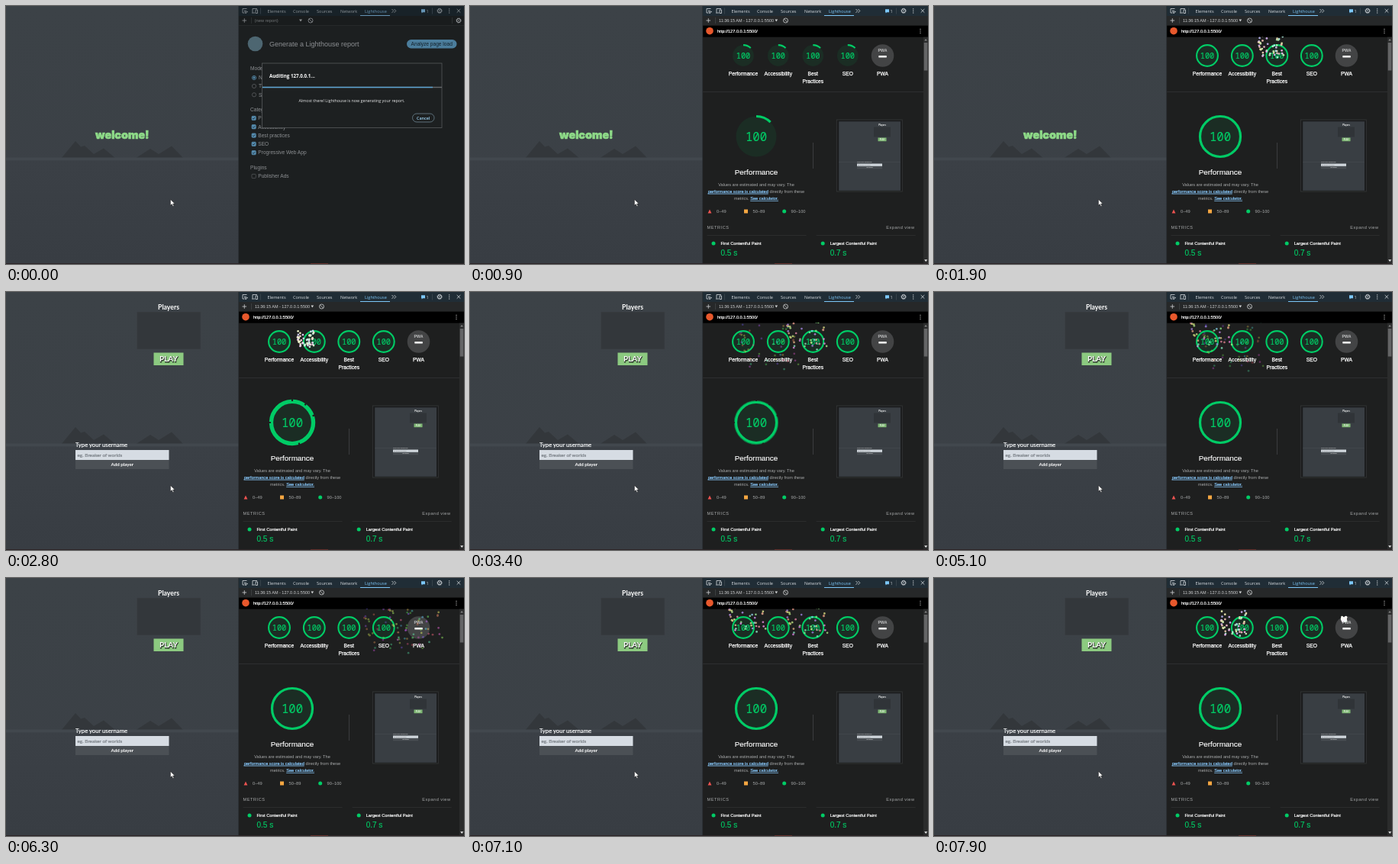
An HTML page that plays this animation: 600x338 px, repeating every 8000 ms.

```html
<!DOCTYPE html>
<html lang="en">
<head>
<meta charset="utf-8">
<title>Audit report</title>
<style>
html,body{margin:0;width:100%;height:100%;overflow:hidden;background:#1d1e1f}
svg{display:block;width:100vw;height:100vh}
text{white-space:pre}
.ui{font-family:"Open Sans","Noto Sans",sans-serif}
.ar{font-family:"Liberation Sans",Arial,sans-serif}
.mono{font-family:"Noto Sans Mono","DejaVu Sans Mono",monospace}
.game{font-family:Lato,Inter,sans-serif}
.title{font-family:Inter,sans-serif;font-weight:900}
</style>
</head>
<body>
<svg id="stage" viewBox="0 0 600 338" preserveAspectRatio="none"></svg>
<script>
const LOOP = 8000, REPORT_AT = 640, FORM_AT = 2300;
const GREEN = '#0c6', LINK = '#86c5f7';

const rect = (x, y, w, h, fill, extra = '') =>
  `<rect x="${x}" y="${y}" width="${w}" height="${h}" fill="${fill}" ${extra}/>`;
const circle = (x, y, r, fill, extra = '') =>
  `<circle cx="${x}" cy="${y}" r="${r}" fill="${fill}" ${extra}/>`;
const path = (d, stroke, width = .8, fill = 'none', extra = '') =>
  `<path d="${d}" stroke="${stroke}" stroke-width="${width}" fill="${fill}" ${extra}/>`;
const text = (x, y, size, fill, str, cls = 'ar', extra = '') =>
  `<text x="${x}" y="${y}" font-size="${size}" fill="${fill}" class="${cls}" ${extra}>${str}</text>`;
const MID = 'text-anchor="middle"', END = 'text-anchor="end"', BOLD = 'font-weight="700"';
const heavier = (color, width = .2) => `stroke="${color}" stroke-width="${width}"`;
const group = (id, body, extra = '') => `<g id="${id}" ${extra}>${body}</g>`;

const kebab = (x, y, c) => [-2.5, 0, 2.5].map(d => circle(x, y + d, .65, c)).join('');
const gear = (x, y, c) => circle(x, y, 2.5, 'none', `stroke="${c}" stroke-width="1"`) +
  circle(x, y, 3.1, 'none', `stroke="${c}" stroke-width=".8" stroke-dasharray="1.2 1.23"`) + circle(x, y, .8, c);
const blockIcon = (x, y, c) => path(`M${x - 3} ${y}a3 3 0 1 0 6 0a3 3 0 1 0-6 0M${x - 2} ${y - 2}l4 4`, c);

function gameBackdrop() {
  return rect(0, 0, 305, 338, 'url(#sky)') +
    path('M72 200L91 177L98 184.5L103 183L115 194L128 186.5L144 200Z', 'none', 0, '#33373b') +
    path('M169 200L189 187L200 194L217 183.5L233 200Z', 'none', 0, '#33373b') +
    rect(0, 198.5, 305, 4, '#42484e') + rect(0, 202.5, 305, 136, 'url(#ground)');
}

function gameForm() {
  return text(213, 23, 8.7, '#fff', 'Players', 'game', MID + ' ' + BOLD) +
    rect(171.5, 26, 83.5, 49, '#33373b', 'stroke="#3d4146" stroke-width=".6"') +
    rect(193.5, 79.5, 39, 16.5, '#8cca80') +
    text(213.5, 91.8, 10, '#2f3d2d', 'PLAY', 'game', MID + ' ' + BOLD + ' ' + heavier('#2f3d2d', .9)) +
    text(213, 91.2, 10, '#fff', 'PLAY', 'game', MID + ' ' + BOLD) +
    text(91, 202.5, 7.7, '#f5f6f7', 'Type your username', 'game', heavier('#f5f6f7')) +
    rect(91, 207, 122.5, 13, '#d6dce3') +
    text(93.5, 215.8, 6.4, '#747a80', 'eg. Breaker of worlds', 'game', heavier('#747a80', .15)) +
    rect(91, 220, 122.5, 12, '#4b5055') +
    text(152.3, 228.2, 6.2, '#fff', 'Add player', 'game', MID + ' ' + BOLD);
}

function tabBar(dim) {
  const ink = dim ? '#8d9499' : '#d5dade', blue = dim ? '#6594b5' : '#7cc7f8';
  const tabs = [[342.5, 'Elements'], [376, 'Console'], [407, 'Sources'], [438, 'Network']];
  return rect(305, 0, 295, 13, dim ? '#182228' : '#202d36') +
    path('M315.5 3.5h-5.5v5.5h2.5M312.5 6l4 1.5l-1.6.8l-.8 1.6z', ink, .8) +
    path('M323 8.5v-5h6M322 9h4M327 5h2.5v4.5h-2.5z', ink, .8) +
    path('M333.5 2.5v8M558.5 2.5v8', '#45515a', .6) +
    tabs.map(([x, s]) => text(x, 8.5, 5.6, ink, s, 'ui')).join('') +
    text(470, 8.5, 5.6, blue, 'Lighthouse', 'ui') + rect(464, 12, 39, 1, blue) +
    path('M505.5 4l2.3 2.4l-2.3 2.4M508.5 4l2.3 2.4l-2.3 2.4', ink, .8) +
    path('M544 4.2h5v4h-3l-1.3 1.2v-1.2h-.7z', 'none', 0, blue) + text(550.5, 8.8, 5.4, ink, '1', 'ui') +
    gear(568, 6.3, ink) + kebab(580.7, 6.4, ink) + path('M590.7 4l4.6 4.6M595.3 4l-4.6 4.6', ink, .8);
}

function setupView() {
  const ink = '#8c8f92', blue = '#568daf';
  const check = (y, label, on = true) =>
    rect(322, y - 2.7, 5.3, 5.3, on ? blue : 'none', `rx="1" stroke="${on ? blue : '#5b5e60'}" stroke-width=".7"`) +
    (on ? path(`M323.1 ${y}l1.1 1.2l2-2.3`, '#16202a', .8) : '') + text(330.3, y + 2.2, 6.6, ink, label);
  const radio = (y, label, on) => circle(325, y, 2.6, 'none', `stroke="${on ? blue : '#5b5e60'}" stroke-width=".8"`) +
    (on ? circle(325, y, 1.4, blue) : '') + text(331, y + 2.2, 6.6, ink, label);
  const checks = ['Performance', 'Accessibility', 'Best practices', 'SEO', 'Progressive Web App'];
  return rect(305, 0, 295, 338, '#1c1f20') + tabBar(true) +
    rect(305, 13, 295, 12.5, '#191c1d') + rect(305, 25, 295, .6, '#2d3133') +
    path('M309.5 19h5.6M312.3 16.2v5.6', ink) + path('M321.5 15v8M584.5 15v8', '#3a3e40', .6) +
    text(325.5, 21, 5.8, '#6f7375', '(new report)') + path('M384 17.5h4l-2 3z', 'none', 0, ink) +
    blockIcon(399, 19, ink) + gear(593, 19, '#a5a9ac') +
    circle(326.5, 49.5, 9.8, '#4d6671') +
    text(345, 52.5, 9, ink, 'Generate a Lighthouse report') +
    rect(525, 44, 65.5, 11.5, '#4b7d9c', 'rx="5.7"') +
    text(557.7, 52, 6.6, '#13212b', 'Analyze page load', 'ar', MID) +
    text(320, 84, 6.6, ink, 'Mode') + radio(94, 'Navigation', true) + radio(105, 'Timespan') + radio(116.3, 'Snapshot') +
    text(320, 137.5, 6.6, ink, 'Categories') +
    checks.map((s, i) => check(147 + i * 11.3, s)).join('') +
    text(320, 213.5, 6.6, ink, 'Plugins') + check(223, 'Publisher Ads', false) +
    rect(335.5, 75, 235.5, 84.5, '#1d2021', 'stroke="#56595b" stroke-width=".8"') +
    text(345, 94.2, 6.2, '#fff', 'Auditing 127.0.0.1...', 'ui', BOLD) +
    rect(336, 105.8, 235, 1.4, '#686b6d') + rect(336, 105.8, 223, 1.4, '#5ca6d6') +
    text(453, 125.7, 5.35, '#e8e9ea', 'Almost there! Lighthouse is now generating your report.', 'ui', MID) +
    rect(532.5, 141, 28.5, 11, 'none', 'rx="5.5" stroke="#6d8491" stroke-width=".8"') +
    text(546.7, 148.6, 5.4, '#9fd6f7', 'Cancel', 'ui', MID + ' font-weight="600"');
}

function gauge(x, y, r, width, size) {
  return circle(x, y, r, '#1b2d24') +
    circle(x, y, r, 'none', `class="arc" pathLength="100" stroke="${GREEN}" stroke-width="${width}" transform="rotate(-90 ${x} ${y})"`) +
    text(x, y + size * .36, size, GREEN, '100', 'mono', MID + ' ' + heavier(GREEN, .15));
}

// Five weighted metric arcs that push out from the large gauge.
function metricRing(x, y, r) {
  let from = 0;
  return [10, 10, 25, 30, 25].map(share => {
    const arc = circle(x, y, r, 'none', `pathLength="100" stroke="${GREEN}" stroke-width="3.4" ` +
      `stroke-dasharray="${share - 1.2} 100" stroke-dashoffset="${-from - .6}" transform="rotate(-90 ${x} ${y})"`);
    from += share;
    return arc;
  }).join('');
}

function thumbnail() {
  return rect(480.3, 149, 86, 94, '#1b1c1d', 'stroke="#363738" stroke-width=".8"') + rect(483.2, 151.3, 80.8, 90.5, '#393e43') +
    rect(483.2, 204, 80.8, 1, '#40454a') + text(540, 157.3, 3, '#fff', 'Players', 'game', MID + ' ' + BOLD) +
    rect(529, 158.5, 22, 13, '#303438') + rect(534.5, 172.5, 11, 4.7, '#7fb774') +
    text(540, 176, 2.8, '#fff', 'PLAY', 'game', MID) +
    text(507, 205.4, 2.2, '#e8e8e8', 'Type your username', 'game') + rect(507, 206.5, 33, 3.4, '#d0d6dc') +
    text(508, 209.1, 1.8, '#777', 'eg. Breaker of worlds', 'game') +
    rect(507, 209.9, 33, 3.3, '#484d52') + text(523.5, 212.4, 1.9, '#fff', 'Add player', 'game', MID);
}

function reportView() {
  const label = (x, y, s) => text(x, y, 6.7, '#fff', s, 'ar', MID + ' ' + heavier('#fff', .25));
  const link = s => `<tspan fill="${LINK}" text-decoration="underline" ${heavier(LINK)}>${s}</tspan>`;
  const metric = (x, name, value) => rect(x - 18, 300, 130, .6, '#353637') + circle(x - 9.5, 311, 2.5, GREEN) +
    text(x, 313, 5.7, '#fff', name, 'ar', heavier('#fff')) + text(x, 326.5, 10, GREEN, value, 'ar', heavier(GREEN, .15));
  const gray = '#a9abac', ink = '#d0d2d4';
  return rect(305, 0, 295, 338, '#1e1f1f') + tabBar(false) +
    rect(305, 13, 295, 12.7, '#262829') + path('M309.5 19h5.6M312.3 16.2v5.6', ink) + path('M321.5 15v8', '#4b4e50', .6) +
    text(326, 21, 5.5, ink, '11:36:15 AM - 127.0.0.1:5500') + path('M399.5 17.6h3.6l-1.8 2.8z', 'none', 0, ink) +
    blockIcon(413.5, 19, ink) +
    rect(305, 25.7, 295, 15, '#000') + circle(314, 32.7, 4.8, '#e8582c') +
    text(324, 34.5, 5.6, '#fff', 'http://127.0.0.1:5500/', 'ar', heavier('#fff')) + kebab(590, 32.8, '#ddd') +
    [358, 403.8, 449.3, 494.8].map(x => gauge(x, 65, 13.9, 2.1, 10.3)).join('') +
    label(358, 91.3, 'Performance') + label(403.8, 91.3, 'Accessibility') + label(449.3, 91.3, 'Best') +
    label(449.3, 100.6, 'Practices') + label(494.8, 91.3, 'SEO') + label(540.5, 91.3, 'PWA') +
    circle(540.5, 65, 14.8, '#434445') + text(540.5, 60, 5.2, '#c4c5c6', 'PWA', 'ar', MID + ' ' + BOLD) +
    rect(535.3, 65, 10.5, 2.5, '#fff', 'rx=".6"') +
    rect(305, 112, 289, .8, '#333435') + rect(449, 179, .8, 34, '#444546') +
    group('peek', metricRing(375, 171, 28.5)) + gauge(375, 171, 26.5, 3.2, 15.6) + thumbnail() +
    text(375, 220.8, 9.9, '#fff', 'Performance', 'ar', MID + ' ' + heavier('#fff', .15)) +
    text(375, 235.7, 5.6, gray, 'Values are estimated and may vary. The', 'ar', MID) +
    text(375, 244.8, 5.6, gray, link('performance score is calculated') + ' directly from these', 'ar', MID) +
    text(375, 254, 5.6, gray, 'metrics. ' + link('See calculator.'), 'ar', MID) +
    path('M314 266.5l2.4 5h-4.8z', 'none', 0, '#ef5350') + rect(359, 266.5, 5, 5, '#f5a742') + circle(411.7, 269, 2.5, GREEN) +
    text(323, 271, 5.7, gray, '0–49') + text(370.5, 271, 5.7, gray, '50–89') + text(420.5, 271, 5.7, gray, '90–100') +
    text(310.5, 291.8, 5.6, gray, 'METRICS', 'ar', 'letter-spacing=".55"') +
    text(582.5, 291.8, 5.6, gray, 'Expand view', 'ar', END + ' letter-spacing=".5"') +
    metric(328.5, 'First Contentful Paint', '0.5 s') + metric(471.7, 'Largest Contentful Paint', '0.7 s') +
    rect(594, 40.7, 6, 298, '#2b2c2c') + rect(594.7, 48, 4.6, 36.5, '#646566') +
    path('M595.3 45.5h3.6l-1.8-2.6z', 'none', 0, '#888') + path('M595.2 332.3h4l-2 2.8z', 'none', 0, '#eee') +
    group('sparks', '', 'clip-path="url(#below)"');
}

const stage = document.getElementById('stage');
stage.innerHTML = `<defs>
  <linearGradient id="sky" x2="0" y2="1"><stop stop-color="#3c4247"/><stop offset="1" stop-color="#3b4046"/></linearGradient>
  <linearGradient id="ground" x2="0" y2="1"><stop stop-color="#3b4046"/><stop offset="1" stop-color="#383d43"/></linearGradient>
  <clipPath id="below"><rect x="305" y="40" width="289" height="298"/></clipPath></defs>` +
  gameBackdrop() +
  group('welcome', text(152.3, 174.3, 14.3, '#8edb88', 'welcome!', 'title', MID + ' ' + heavier('#8edb88', .6))) +
  group('form', gameForm()) + group('setup', setupView()) + group('report', reportView()) +
  rect(304.4, 0, .8, 338, '#24282b') + rect(0, 337, 600, 1, '#2c2426') + rect(399, 337, 23, 1, '#63302c') +
  path('M215.4 253.3v8l1.9-1.7l1.3 2.9l1.4-.6l-1.3-2.8h2.5z', '#111', .5, '#fff');

const [welcome, form, setup, report, peek, sparks] =
  ['welcome', 'form', 'setup', 'report', 'peek', 'sparks'].map(id => document.getElementById(id));
const arcs = [...document.querySelectorAll('.arc')];

const clamp = v => Math.max(0, Math.min(1, v));
const show = (el, on) => { el.style.display = on ? '' : 'none'; };

// CSS cubic-bezier with y1 = 0 and y2 = 1, solved by bisection.
function bezier(x1, x2, x) {
  let lo = 0, hi = 1, u = .5;
  for (let i = 0; i < 18; i++) {
    u = (lo + hi) / 2;
    const at = 3 * u * (1 - u) ** 2 * x1 + 3 * u * u * (1 - u) * x2 + u ** 3;
    if (at < x) lo = u; else hi = u;
  }
  return 3 * u * u * (1 - u) + u ** 3;
}
const easeIn = x => bezier(.42, 1, x);
const easeOut = x => bezier(0, .58, x);

let seed = 41;
const random = () => (seed = seed * 16807 % 2147483647) / 2147483647;
const CSS_PX = .439, WIDTH = 289;
const particles = Array.from({length: 51}, () => ({
  x: (random() * 194 - 97) * CSS_PX, y: (random() * 196 - 163) * CSS_PX, hue: random() * 360
}));
const spots = [[.47, .04], [.30, .07], [.70, .06], [.20, .03], [.80, .03]];
const bursts = [{start: 1640, period: 1000}, {start: 2850, period: 1250}].map(b => {
  const g = document.createElementNS('http://www.w3.org/2000/svg', 'g');
  g.innerHTML = particles.map(() => circle(0, 0, 1.35, '#fff')).join('');
  sparks.append(g);
  return {...b, g, dots: [...g.children]};
});

function drawBurst({start, period, g, dots}, t) {
  show(g, t >= start);
  const beats = Math.max(0, (t - start) / period), phase = beats % 1;
  const [left, top] = spots[Math.floor(beats) % spots.length];
  const spread = easeOut(phase), fall = easeIn(phase);
  g.setAttribute('transform', `translate(${306 + left * WIDTH} ${47 + top * WIDTH + fall * 80 * CSS_PX})`);
  g.setAttribute('opacity', 1 - fall);
  dots.forEach((dot, i) => {
    const p = particles[i];
    dot.setAttribute('cx', p.x * spread);
    dot.setAttribute('cy', p.y * spread);
    dot.setAttribute('fill', `hsl(${p.hue} 80% ${100 - 40 * spread}%)`);
  });
}

function draw(t) {
  show(setup, t < REPORT_AT);
  show(report, t >= REPORT_AT);
  show(welcome, t < FORM_AT);
  show(form, t >= FORM_AT);

  const filled = easeOut(clamp((t - REPORT_AT - 200) / 800));
  arcs.forEach(a => a.setAttribute('stroke-dasharray', `${filled * 100} 101`));

  const out = clamp((t - 2150) / 200) * clamp((3500 - t) / 200);
  peek.setAttribute('opacity', out);
  peek.setAttribute('transform', `translate(375 171) scale(${.93 + .07 * out}) translate(-375 -171)`);

  bursts.forEach(b => drawBurst(b, t));
}

const begin = performance.now();
function tick() {
  draw((performance.now() - begin) % LOOP);
  requestAnimationFrame(tick);
}
tick();
</script>
</body>
</html>
```
